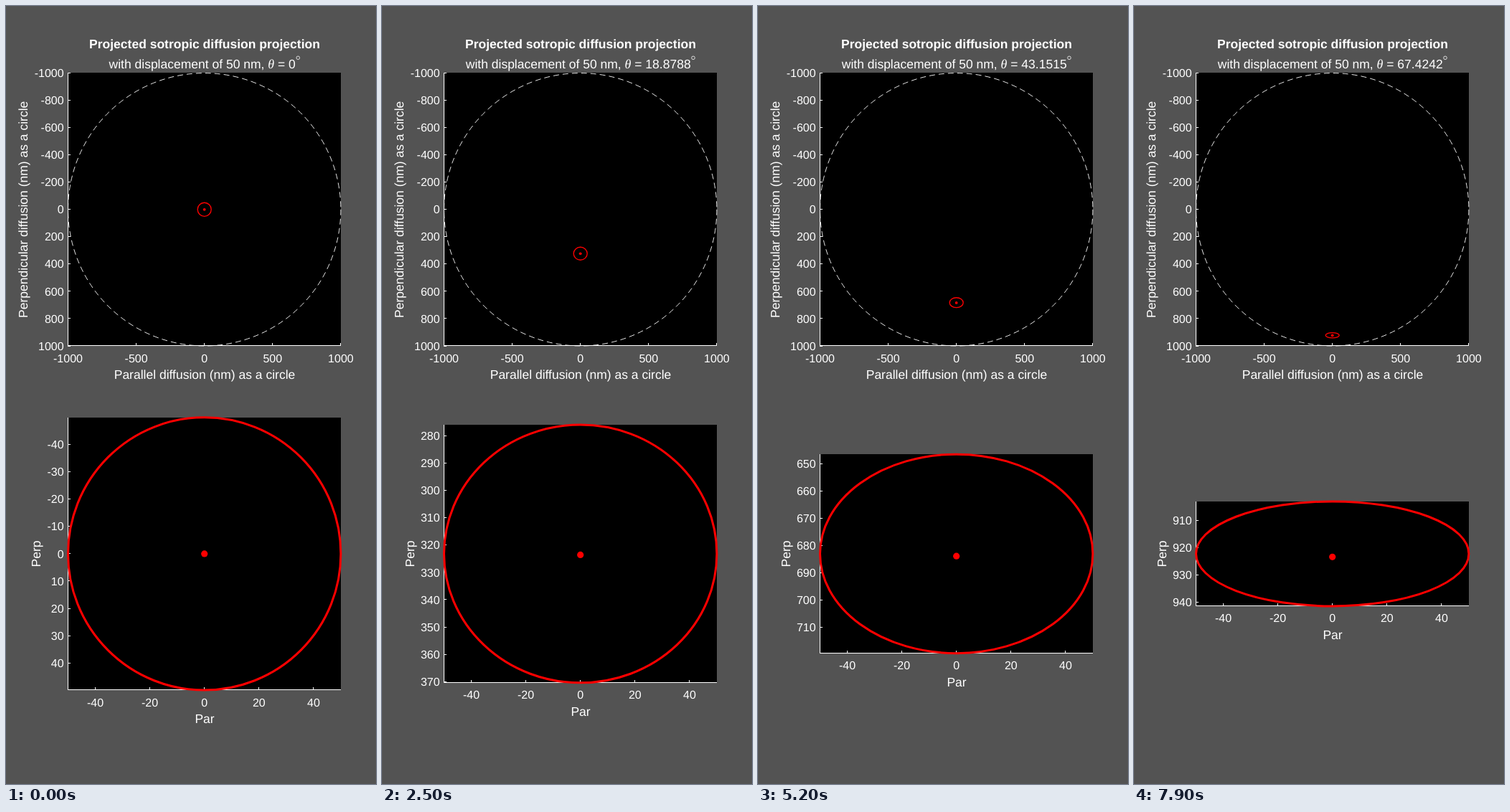
Recreate the animation shown at these times as an HTML page. Size 516x1085 px, loop 8 s.

```html
<!DOCTYPE html>
<html lang="en">
<head>
<meta charset="utf-8">
<title>Projected diffusion</title>
<style>
  html, body { margin: 0; width: 100%; height: 100%; overflow: hidden; background: #535353; }
  svg { display: block; width: 516px; height: 1085px; }
  text { font: 17.5px "Liberation Sans", Arial, sans-serif; fill: #fff; text-anchor: middle;
         white-space: pre; text-rendering: geometricPrecision; }
  .tick { font-size: 16px; }
  .right { text-anchor: end; }
  .bold { font-weight: bold; }
  .theta { font: italic 18px "Liberation Serif", "Times New Roman", serif; }
  .axis { stroke: #fff; stroke-width: 1; fill: none; shape-rendering: crispEdges; }
  .ring { stroke: #f00; fill: none; }
  .dot { fill: #f00; }
</style>
</head>
<body>
<svg id="stage" viewBox="0 0 516 1085"></svg>
<script>
const stage = document.getElementById('stage');
const CX = 276.7, HALF = 190.2, TOP_Y = 283.8, LOW_Y = 763.9;
const RADIUS = 1000, PHI = 0.05;
const REACH = RADIUS * Math.sin(PHI);
const TOP_SCALE = HALF / RADIUS, LOW_SCALE = HALF / REACH;
const TICK_PX = 16;
const STEP_MS = 100, HOLD_STEPS = 4, LOOP_MS = 8000, STEP_DEG = 89 / 99;

function add(parent, tag, attrs, content) {
  const el = document.createElementNS('http://www.w3.org/2000/svg', tag);
  set(el, attrs);
  if (content !== undefined) el.textContent = content;
  parent.appendChild(el);
  return el;
}

function set(el, attrs) {
  for (const name in attrs) el.setAttribute(name, attrs[name]);
}

function label(parent, x, y, content, cls = '') {
  return add(parent, 'text', { x, y, class: cls }, content);
}

function upright(parent, content) {
  return add(parent, 'text', {}, content);
}

function placeUpright(el, x, y) {
  set(el, { transform: `translate(${x} ${y}) rotate(-90)` });
}

function range(from, to, step) {
  const list = [];
  for (let v = Math.ceil(from / step) * step; v <= to; v += step) list.push(v || 0);
  return list;
}

function labelWidth(v) {
  const digits = String(Math.abs(v)).length;
  return TICK_PX * (digits * 0.556 + (v < 0 ? 0.333 : 0));
}

// Black plot area with left and bottom axes, ticks pointing inwards.
function drawAxes(g, xLabel, yLabel, cy, halfH, xTicks, yTicks, scale, yMid) {
  g.textContent = '';
  const left = 87, right = 467;
  const top = Math.round(cy - halfH - 0.2), bottom = Math.round(cy + halfH);
  add(g, 'rect', { x: left, y: top, width: right - left, height: bottom - top,
                   'shape-rendering': 'crispEdges' });
  let d = `M${left - 0.5} ${top}V${bottom - 0.5}H${right}`;
  for (const v of xTicks) {
    const x = CX + v * scale;
    d += `M${Math.floor(x) + 0.5} ${bottom}v-4`;
    label(g, x, Math.floor(cy + halfH) + 23, v, 'tick');
  }
  for (const v of yTicks) {
    const y = cy + (v - yMid) * scale;
    d += `M${left - 1} ${Math.floor(y) + 0.5}h4`;
    label(g, 80.6, Math.round(y + 5.6), v, 'tick right');
  }
  add(g, 'path', { d, class: 'axis' });
  set(xLabel, { x: 277, y: bottom + 46 });
  const widest = Math.max(...yTicks.map(labelWidth));
  placeUpright(yLabel, Math.floor(71.8 - widest), cy);
}

// Five significant digits below 10, four decimals above.
function shortNumber(v) {
  if (!v) return '0';
  const digits = Math.max(Math.floor(Math.log10(v)) + 5, 5);
  return String(Number(v.toPrecision(digits)));
}

label(stage, 277, 59, 'Projected sotropic diffusion projection', 'bold');
const subtitle = label(stage, 273.7, 87, '');
add(subtitle, 'tspan', {}, 'with displacement of 50 nm, ');
add(subtitle, 'tspan', { class: 'theta' }, 'θ');
const value = add(subtitle, 'tspan', {});
const degree = add(stage, 'circle', { cy: 72.3, r: 2.3, fill: 'none', stroke: '#fff', 'stroke-width': 0.8 });

drawAxes(add(stage, 'g', {}),
         label(stage, 0, 0, 'Parallel diffusion (nm) as a circle'),
         upright(stage, 'Perpendicular diffusion (nm) as a circle'),
         TOP_Y, HALF, range(-1000, 1000, 500), range(-1000, 1000, 200), TOP_SCALE, 0);
add(stage, 'circle', { cx: CX, cy: TOP_Y, r: HALF, fill: 'none', stroke: '#fff',
                       'stroke-width': 0.9, 'stroke-dasharray': '8 5' });
const smallRing = add(stage, 'ellipse', { cx: CX, rx: REACH * TOP_SCALE, class: 'ring', 'stroke-width': 1.35 });
const smallDot = add(stage, 'circle', { cx: CX, r: 1.9, class: 'dot' });

const lowAxes = add(stage, 'g', {});
const par = label(stage, 0, 0, 'Par');
const perp = upright(stage, 'Perp');
const bigRing = add(stage, 'ellipse', { cx: CX, cy: LOW_Y, rx: HALF, class: 'ring', 'stroke-width': 3 });
const bigDot = add(stage, 'circle', { cx: CX, r: 4.6, class: 'dot' });

function render(step) {
  const deg = step * STEP_DEG, angle = deg * Math.PI / 180;
  const tip = RADIUS * Math.sin(angle);
  const mid = tip * Math.cos(PHI);
  const ry = REACH * Math.cos(angle);

  value.textContent = ' = ' + shortNumber(deg);
  set(degree, { cx: 273.7 + subtitle.getComputedTextLength() / 2 + 3.4 });

  set(smallRing, { cy: TOP_Y + mid * TOP_SCALE, ry: ry * TOP_SCALE });
  set(smallDot, { cy: TOP_Y + tip * TOP_SCALE });

  drawAxes(lowAxes, par, perp, LOW_Y, ry * LOW_SCALE, range(-40, 40, 20),
           range(mid - ry, mid + ry, 10), LOW_SCALE, mid);
  set(bigRing, { ry: ry * LOW_SCALE });
  set(bigDot, { cy: LOW_Y + (tip - mid) * LOW_SCALE });
}

let shown = -1;
function tick() {
  const t = performance.now() % LOOP_MS;
  const step = Math.max(0, Math.floor(t / STEP_MS) - HOLD_STEPS);
  if (step !== shown) render(shown = step);
  requestAnimationFrame(tick);
}
tick();
</script>
</body>
</html>
```
